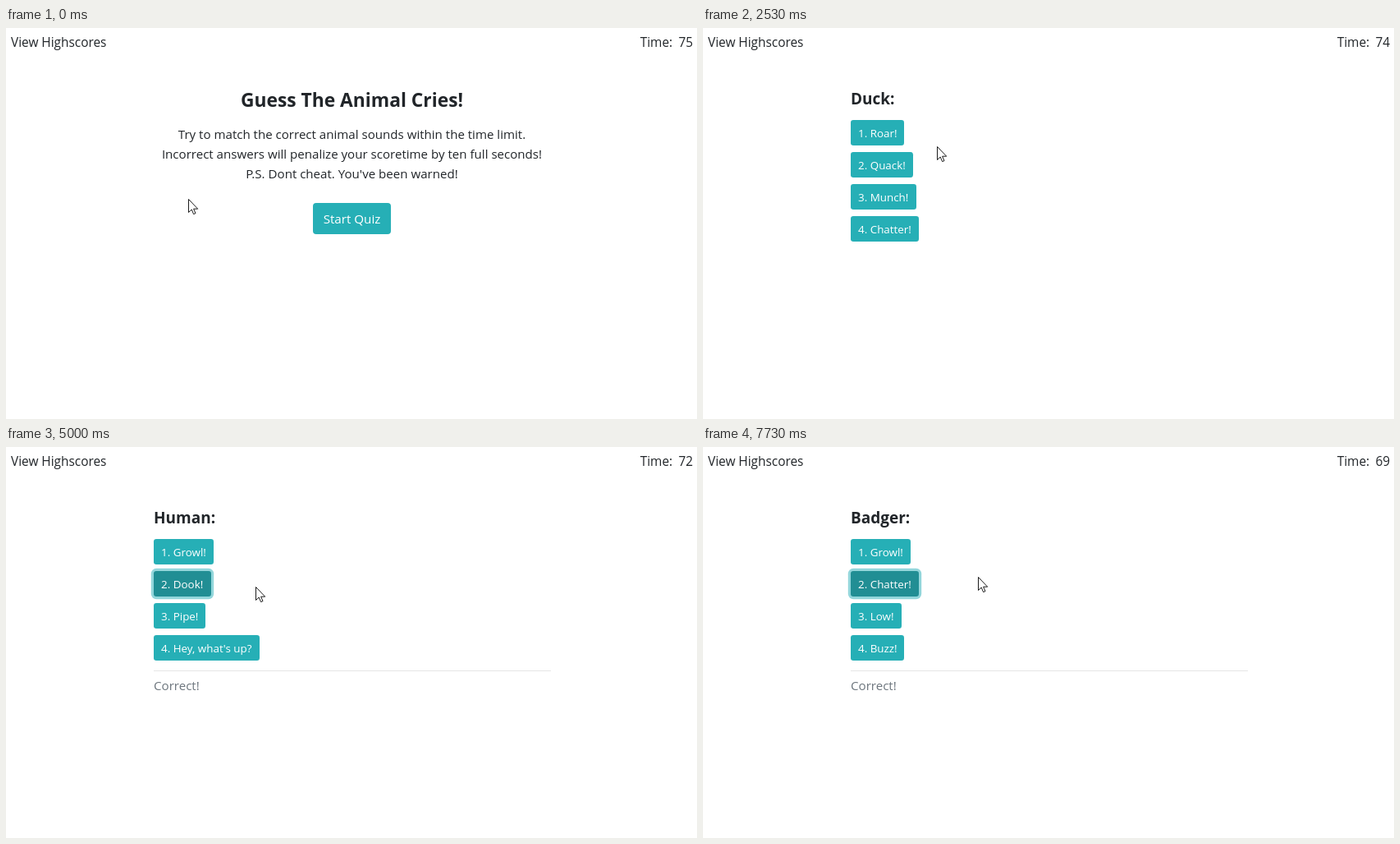
Animation, 842 px wide and 476 px high, one loop 8000 ms. Source, as an HTML page:

```html
<!DOCTYPE html>
<html lang="en">
<head>
<meta charset="utf-8">
<title>Animal sound quiz</title>
<style>
  html, body { margin: 0; width: 100%; height: 100%; overflow: hidden; background: #fff; }
  svg { display: block; width: 100vw; height: 100vh; }
  text { font: 15.4px "Open Sans", "Noto Sans", sans-serif; fill: #212529; white-space: pre; }
  .mid { text-anchor: middle; }
  .end { text-anchor: end; }
  .title { font-size: 22.8px; font-weight: 700; }
  .animal { font-size: 19px; font-weight: 700; }
  .body { font-size: 15.1px; }
  .big { fill: #fff; font-size: 15.2px; }
  .small { fill: #fff; font-size: 13.4px; }
  .note { fill: #6c757d; font-size: 15.1px; }
  .cursor { fill: #fff; stroke: #111; stroke-width: .95; stroke-linejoin: round; }
</style>
</head>
<body>
<svg id="stage" viewBox="0 0 842 476"></svg>
<script>
const LOOP = 8000, FADE = 150;
const BASE = [38, 175, 182], DARK = [33, 142, 148];

// at: page appears; press: mouse goes down on button `pressed`;
// focus: button focused on arrival; buttons: caption, width
const pages = [
  { at: 0, press: 1030, pressed: 0, buttons: [['Start Quiz', 95]] },
  { at: 1065, press: 4130, pressed: 1, name: 'Duck:',
    buttons: [['Roar!', 65], ['Quack!', 76], ['Munch!', 80], ['Chatter!', 83]] },
  { at: 4190, press: 5990, pressed: 3, focus: 1, name: 'Human:',
    buttons: [['Growl!', 73], ['Dook!', 70], ['Pipe!', 63], ["Hey, what's up?", 129]] },
  { at: 6040, press: 7110, pressed: 1, focus: 3, name: 'Ferret:',
    buttons: [['Honk!', 70], ['Dook!', 70], ['Bleat!', 68], ['Hiss!', 62]] },
  { at: 7160, press: LOOP, focus: 1, name: 'Badger:',
    buttons: [['Growl!', 73], ['Chatter!', 83], ['Low!', 62], ['Buzz!', 65]] }
];

const ticks = [2070, 3095, 4100, 5110, 6120, 7130];

// Pointer path: time, x, y
const path = [
  [0, 222, 208], [300, 222, 208], [550, 325, 220], [720, 425, 226], [850, 454, 224],
  [1670, 454, 224], [1780, 375, 184], [1900, 287, 146], [2510, 287, 146], [2530, 285, 144],
  [2800, 285, 144], [2930, 279, 155], [3390, 279, 155], [3430, 278, 157], [3570, 278, 157],
  [3670, 272, 176], [3950, 237, 168], [4770, 237, 168], [5000, 304, 170], [5200, 314, 174],
  [5400, 314, 174], [5640, 302, 218], [5870, 281, 247], [6570, 281, 247], [6780, 262, 205],
  [7000, 238, 170], [7430, 238, 170], [7580, 290, 162], [7730, 335, 158], [LOOP, 335, 158]
];

const stage = document.getElementById('stage');

function add(parent, tag, attrs, content) {
  const el = document.createElementNS('http://www.w3.org/2000/svg', tag);
  for (const key in attrs) el.setAttribute(key, attrs[key]);
  if (content) el.textContent = content;
  parent.appendChild(el);
  return el;
}

const label = (parent, cls, x, y, content) => add(parent, 'text', { class: cls, x, y }, content);

function addButton(page, [caption, w], i) {
  const start = page === pages[0];
  const box = start ? { x: 374, y: 213, w, h: 38, r: 4 } : { x: 180, y: 112 + 39 * i, w, h: 31, r: 3.2 };
  const g = page.group;
  box.ring = add(g, 'rect', { fill: '#93d6db' });
  box.face = add(g, 'rect', { x: box.x, y: box.y, width: w, height: box.h, rx: box.r });
  if (start) label(g, 'big mid', box.x + w / 2, 238, caption);
  else label(g, 'small', box.x + 9, box.y + 21, `${i + 1}. ${caption}`);
  return box;
}

label(stage, '', 6, 23, 'View Highscores');
label(stage, '', 772.7, 23, 'Time:');
const clock = label(stage, 'end', 837, 23, '75');

for (const page of pages) {
  const g = page.group = add(stage, 'g', {});
  page.boxes = page.buttons.map((b, i) => addButton(page, b, i));
  if (page.name) label(g, 'animal', 180, 93, page.name);
  if (page.focus !== undefined) {
    add(g, 'rect', { x: 180, y: 272, width: 484, height: 1, fill: '#e6e6e6' });
    label(g, 'note', 180, 296, 'Correct!');
  }
}

const intro = pages[0].group;
label(intro, 'title mid', 421.5, 96, 'Guess The Animal Cries!');
[
  'Try to match the correct animal sounds within the time limit.',
  'Incorrect answers will penalize your scoretime by ten full seconds!',
  "P.S. Dont cheat. You've been warned!"
].forEach((line, i) => label(intro, 'body mid', 421.5, 135 + 24 * i, line));

const arrow = add(stage, 'path', { class: 'cursor',
  d: 'M.5.5V16.5L4.2 13L6.6 18.6L9 17.6L6.6 12.2H11.7Z' });
const hand = add(stage, 'path', { class: 'cursor',
  d: 'M-2 14.5V2a2 2 0 0 1 4 0V8.5c1-1 3-.6 3.2.8c1-.8 2.8-.3 2.9 1c1-.6 2.2 0 2.2 1.4V15.5c0 3-1.8 4-1.8 7.2H-1.5c0-2.6-2.5-4-4.6-8.2c-1-2.2.6-3.4 2-2.2z' });

// Smooth through moving points, at rest next to a pause
function slope(i, k) {
  const a = path[i - 1], b = path[i], c = path[i + 1];
  const still = (p, q) => p[1] === q[1] && p[2] === q[2];
  if (!a || !c || still(a, b) || still(b, c)) return 0;
  return (c[k] - a[k]) / (c[0] - a[0]);
}

function pointer(t) {
  let i = 0;
  while (i < path.length - 2 && path[i + 1][0] <= t) i++;
  const a = path[i], b = path[i + 1], d = b[0] - a[0], u = (t - a[0]) / d;
  const at = k => {
    const s = u * u * (3 - 2 * u);
    return a[k] + (b[k] - a[k]) * s
      + d * u * (1 - u) * ((1 - u) * slope(i, k) - u * slope(i + 1, k));
  };
  return [Math.round(at(1)), Math.round(at(2))];
}

const pageAt = t => pages.filter(p => p.at <= t).pop();

function hovered(page, [x, y]) {
  return page.boxes.findIndex(b => x >= b.x && x < b.x + b.w && y >= b.y && y < b.y + b.h);
}

function stateAt(t) {
  const page = pageAt(t), pos = pointer(t);
  return { page, pos, hover: hovered(page, pos), focus: t >= page.press ? page.pressed : page.focus };
}

// Share of the last moments for which a test held: a linear fade
function fade(states, test) {
  return states.filter(test).length / states.length;
}

function draw(t) {
  const now = stateAt(t), past = [];
  for (let k = 0; k < FADE; k += 10) past.push(stateAt(Math.max(0, t - k)));

  for (const p of pages) p.group.style.display = p === now.page ? '' : 'none';
  clock.textContent = 75 - ticks.filter(x => x <= t).length;

  now.page.boxes.forEach((b, i) => {
    const same = s => (s.page === pages[0]) === (now.page === pages[0]);
    const dark = fade(past, s => same(s) && (s.hover === i || s.focus === i));
    const grow = 3.2 * fade(past, s => same(s) && s.focus === i);
    const rgb = BASE.map((v, k) => Math.round(v + (DARK[k] - v) * dark));
    b.face.setAttribute('fill', `rgb(${rgb})`);
    const ring = { x: b.x - grow, y: b.y - grow, width: b.w + 2 * grow, height: b.h + 2 * grow, rx: b.r + grow };
    for (const key in ring) b.ring.setAttribute(key, ring[key]);
    b.ring.style.display = grow ? '' : 'none';
  });

  const over = now.hover >= 0;
  arrow.style.display = over ? 'none' : '';
  hand.style.display = over ? '' : 'none';
  (over ? hand : arrow).setAttribute('transform', `translate(${now.pos})`);
}

const begin = performance.now();
function tick() {
  draw((performance.now() - begin) % LOOP);
  requestAnimationFrame(tick);
}
tick();
</script>
</body>
</html>
```
